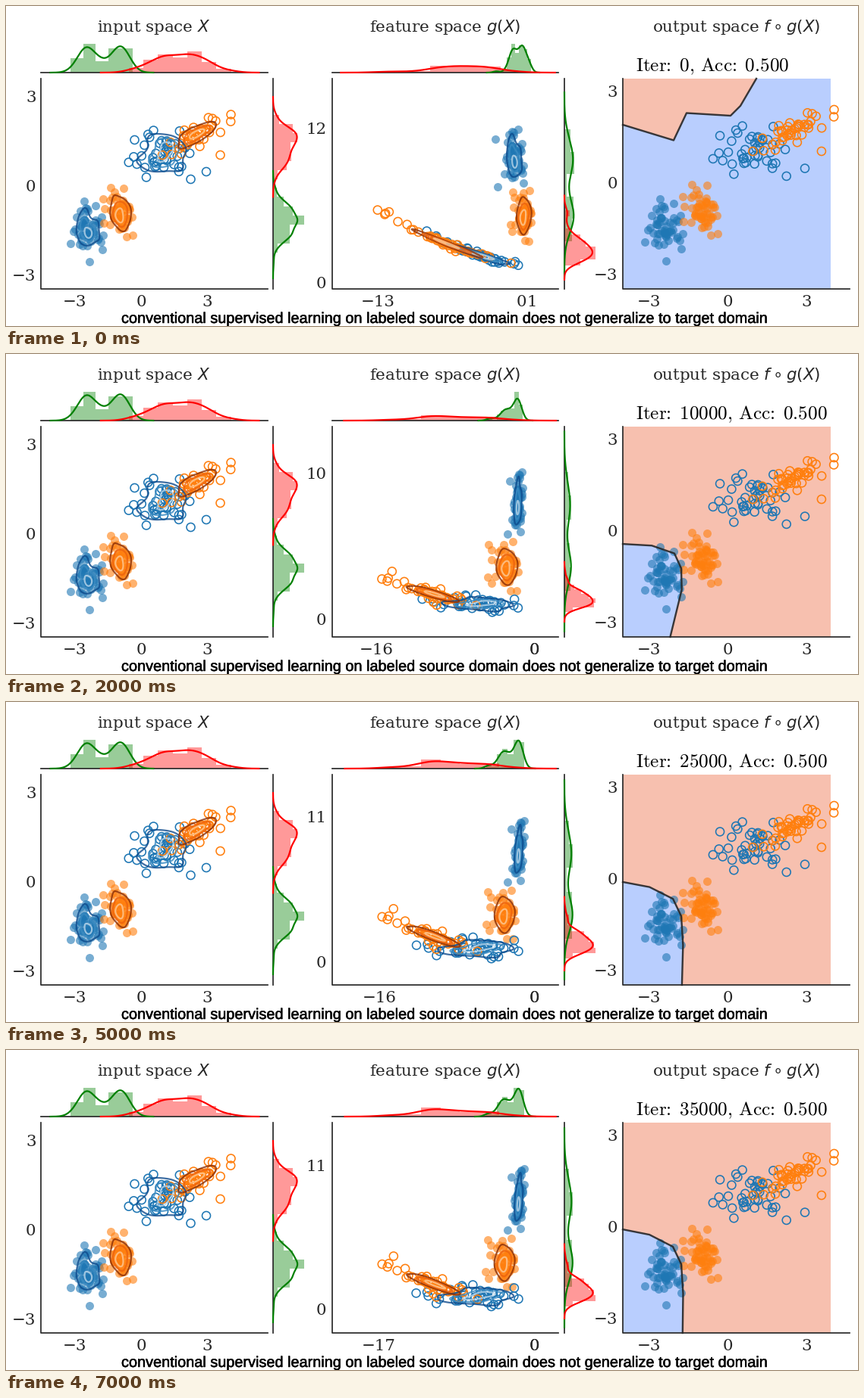
Recreate the animation shown at these times as a matplotlib script. Size 1123x423 px, loop 8 s.

```python
import matplotlib.pyplot as plt
import matplotlib.patheffects as pe
import numpy as np
from matplotlib.animation import ArtistAnimation

W, H, DPI = 1123, 423, 64
PX = 72 / DPI                      # points per pixel
STEPS = 8
INK = "#262626"
PEACH, SKY = "#f7c0af", "#b9cefe"
BLUE, ORANGE = "#1f77b4", "#ff7f0e"
BLUES = ("#0d4a8c", "#3b8bc2", "#b9d6ea")
ORANGES = ("#8a2d04", "#ec620f", "#fdc997")

plt.rcParams["font.family"] = "DejaVu Serif"
fig = plt.figure(figsize=(W / DPI, H / DPI), dpi=DPI, facecolor="white")
ax = fig.add_axes([0, 0, 1, 1])
ax.set(xlim=(0, W), ylim=(H, 0))
ax.axis("off")
rng = np.random.default_rng(11)


# ---- drawing helpers -----------------------------------------------------

def line(xy, color, width, z=3, alpha=1):
    return ax.plot(*np.transpose(xy), color=color, lw=width * PX, zorder=z,
                   alpha=alpha)


def dots(xy, color, filled):
    size = (11 * PX) ** 2
    if filled:
        return [ax.scatter(*xy.T, s=size, color=color, alpha=0.6, lw=0, zorder=3)]
    return [ax.scatter(*xy.T, s=size, facecolor="none", edgecolor=color,
                       lw=1.6 * PX, zorder=4)]


def rings(xy, shades):
    """Contours of the cloud's kernel density."""
    cov = np.cov(xy.T)
    inv = np.linalg.inv(cov * len(xy) ** (-1 / 3))
    pad = 1.5 * np.sqrt(np.diag(cov))
    lo, hi = xy.min(0) - pad, xy.max(0) + pad
    gx, gy = np.meshgrid(*np.linspace(lo, hi, 120).T)
    dx, dy = gx[..., None] - xy[:, 0], gy[..., None] - xy[:, 1]
    dist = inv[0, 0] * dx**2 + 2 * inv[0, 1] * dx * dy + inv[1, 1] * dy**2
    z = np.exp(-dist / 2).sum(-1)
    return [ax.contour(gx, gy, z / z.max(), levels=(0.36, 0.62, 0.86),
                       colors=shades, linewidths=2.2 * PX, alpha=0.8, zorder=5)]


def marginal(groups, base, upright):
    """Histogram and density of each group, the tallest bar fixed in size."""
    hists = [np.histogram(v, np.histogram_bin_edges(v, "fd"), density=True)
             for v in groups]
    scale = (38 if upright else 41) / max(h.max() for h, _ in hists)

    def place(pos, height):
        return (pos, base - height) if upright else (base + height, pos)

    out = []
    for v, (h, edges), color in zip(groups, hists, ("green", "red")):
        steps = np.concatenate([[0], np.repeat(h * scale, 2), [0]])
        out += ax.fill(*place(np.repeat(edges, 2), steps), color=color,
                       alpha=0.4, lw=0, zorder=1)
        bw = v.std() * len(v) ** -0.2
        x = np.linspace(v.min() - 3 * bw, v.max() + 3 * bw, 200)
        bells = np.exp(-((x[:, None] - v) / bw) ** 2 / 2)
        density = bells.mean(1) / (bw * np.sqrt(2 * np.pi))
        out += line(place(x, density * scale), color, 2.2, 5) if False else \
            ax.plot(*place(x, density * scale), color=color, lw=2.2 * PX, zorder=5)
    return out


def label(x, y, text, ha="center"):
    return [ax.text(x, y + 7.8, text, size=21.33 * PX, ha=ha, color=INK)]


def num(n):
    return str(n).replace("-", "\u2212")


# ---- point clouds --------------------------------------------------------

def seed_cloud(count, strays):
    """Normal sample with exact zero mean and unit covariance, plus strays."""
    z = rng.normal(size=(count, 2))
    z -= z.mean(0)
    z = z @ np.linalg.inv(np.linalg.cholesky(np.cov(z.T))).T
    return np.vstack([z, strays])


def cloud(z, pose):
    """Stretch a sample along one axis, with thickness and sag across it."""
    cx, cy, ux, uy, thick, sag = pose
    u, v = z.T
    across = np.array([-uy, ux]) / np.hypot(ux, uy)
    drop = thick * v + sag * (1 - u**2 / 2)
    return np.array([cx, cy]) + np.outer(u, [ux, uy]) + np.outer(drop, across)


def blend(start, early, late, k):
    """First pose, then a decaying drift from the early to the late one."""
    if k == 0:
        return np.array(start, float)
    left = np.exp(-(k - 1) / 1.1)
    return np.array(late, float) + left * (np.array(early) - np.array(late))


# Poses: centre x, y, long axis x, y, thickness, sag
GROUPS = [
    dict(color=BLUE, shades=BLUES, filled=True,
         seed=seed_cloud(52, [(2.2, 4), (-1.5, 4)]),
         home=(108, 295, 1, 14, 10, 0), far=[(109.5, 338), (103, 258)],
         poses=((670, 200, 1, 17, 6, 0), (673, 196, 0, 19, 3, 0),
                (676, 197, -1.5, 19, 3, 0))),
    dict(color=ORANGE, shades=ORANGES, filled=True,
         seed=seed_cloud(52, [(-2.1, 2.5), (0.8, 3)]),
         home=(150, 274, 3, 14, 8.5, 0), far=[(138, 240), (129, 287)],
         poses=((682, 277, 0, 15, 5.8, 0), (664, 281, 2.5, 14.5, 9, 0),
                (656, 281, 0.5, 14.5, 8, 0))),
    dict(color=BLUE, shades=BLUES, filled=False,
         seed=seed_cloud(42, [(-0.5, -2.2)]),
         home=(206, 196, 18, -6, 14, 0),
         far=[(169.5, 177), (264, 219), (243.5, 229)],
         poses=((622, 326, 29, 9.5, 1.8, 3), (625, 337, 27, 3.5, 2.6, 0),
                (617, 325, 32, 0, 6.5, 1))),
    dict(color=ORANGE, shades=ORANGES, filled=False,
         seed=seed_cloud(46, [(-2.3, -2.8), (-2.7, 1)]),
         home=(250, 172, 18, -11, 9, 0), far=[(296.5, 143.5), (282.5, 197)],
         poses=((582, 312, 35, 13.5, 1.6, 3), (560, 328, 24, 3.5, 3, 1),
                (563, 308, 25, 9, 4.5, 2))),
]


def margins(clouds, top, side):
    out = []
    for axis, base in enumerate((top, side)):
        values = [np.concatenate([clouds[i][:, axis], clouds[i + 1][:, axis]])
                  for i in (0, 2)]
        out += marginal(values, base, axis == 0)
    return out


# ---- fixed parts ---------------------------------------------------------

inputs = []
for g in GROUPS:
    regular = g["seed"][np.abs(g["seed"]).max(1) < 2.4]
    xy = np.vstack([cloud(regular, g["home"]), g["far"]])
    inputs.append(xy)
    dots(xy, g["color"], g["filled"])
    rings(xy, g["shades"])
    out_xy = [870, 137] + np.array([1.1845, 1.0283]) * (xy - [109.5, 143.5])
    dots(out_xy, g["color"], g["filled"])
margins(inputs, 88, 352)

for left, right in ((46, 345), (430, 728), (813, 1112)):
    line([(left, 96), (left, 374), (right, 374)], INK, 1.7, 6)
for left, right, side in ((46, 345, 352), (430, 728, 736)):
    line([(left, 88), (right, 88)], INK, 1.7, 2)
    line([(side, 96), (side, 374)], INK, 1.7, 2)

for n in (-3, 0, 3):
    label(178 + 29.2 * n, 389, num(n))
    label(39.5, 237.5 - 39.3 * n, num(n), "right")
    label(951.5 + 34.7 * n, 389, num(n))
    label(806.5, 232.8 - 40.3 * n, num(n), "right")

label(194.5, 26.7, "input space $X$")
label(579, 26.7, "feature space $g(X)$")
label(963, 26.7, r"output space $f\circ g(X)$")
ax.text(579.5, 419, "conventional supervised learning on labeled source domain "
        "does not generalize to target domain", ha="center", color="black",
        family="Liberation Sans", size=19.9 * PX,
        path_effects=[pe.withStroke(linewidth=0.5 * PX, foreground="black")])


# ---- changing parts ------------------------------------------------------

def features(k):
    clouds = [cloud(g["seed"], blend(*g["poses"], k)) for g in GROUPS]
    out = margins(clouds, 88, 736)
    for g, xy in zip(GROUPS, clouds):
        out += dots(xy, g["color"], g["filled"]) + rings(xy, g["shades"])
    return out


def ticks(k):
    """Whole-number ticks that fit the current zoom."""
    zero_x, zero_y, unit_y = blend((679, 365, 17), (696, 361, 22.2),
                                   (696, 342.5, 17.3), k)
    unit_x = 13 - 0.0045 * (k - 1) ** 3 if k else 14.5
    low, high = -int((zero_x - 488) / unit_x), int((705 - zero_x) / unit_x)
    out = []
    for n in (low, 0, high):
        out += label(zero_x + n * unit_x, 389, num(n))
    for n in (0, int((zero_y - 145) / unit_y)):
        out += label(422.5, zero_y - n * unit_y, num(n), "right")
    return out


def regions(k):
    first = [(989, 96), (968, 132), (955, 145), (897, 141.5), (880, 177.5), (813, 157)]
    early = [(813, 272), (856, 267), (884, 269), (890, 284), (888, 296), (851, 374)]
    late = [(813, 237), (848, 244), (879, 260), (890, 283), (892.5, 322), (892, 374)]
    edge = blend(first, early, late, k)
    back, front = (PEACH, SKY) if k else (SKY, PEACH)
    corner = (813, 374 if k else 96)
    out = ax.fill([813, 1087, 1087, 813], [96, 96, 374, 374], color=back, lw=0,
                  zorder=0)
    out += ax.fill(*np.vstack([edge, corner]).T, color=front, lw=0, zorder=0.5)
    return out + line(edge, "#222222", 2.4, 5, 0.88)


def score(k):
    text = (r"$\text{Iter:}\hspace{0.48}\text{%d,}\hspace{0.36}"
            r"\text{Acc:}\hspace{0.48}\text{0.500}$" % (5000 * k))
    return [ax.text(830.5, 86.5, text, size=25.2 * PX, color="black",
                    math_fontfamily="cm")]


frames = [regions(k) + features(k) + ticks(k) + score(k) for k in range(STEPS)]
anim = ArtistAnimation(fig, frames, interval=1000, repeat=True, repeat_delay=0)
plt.show()
```
